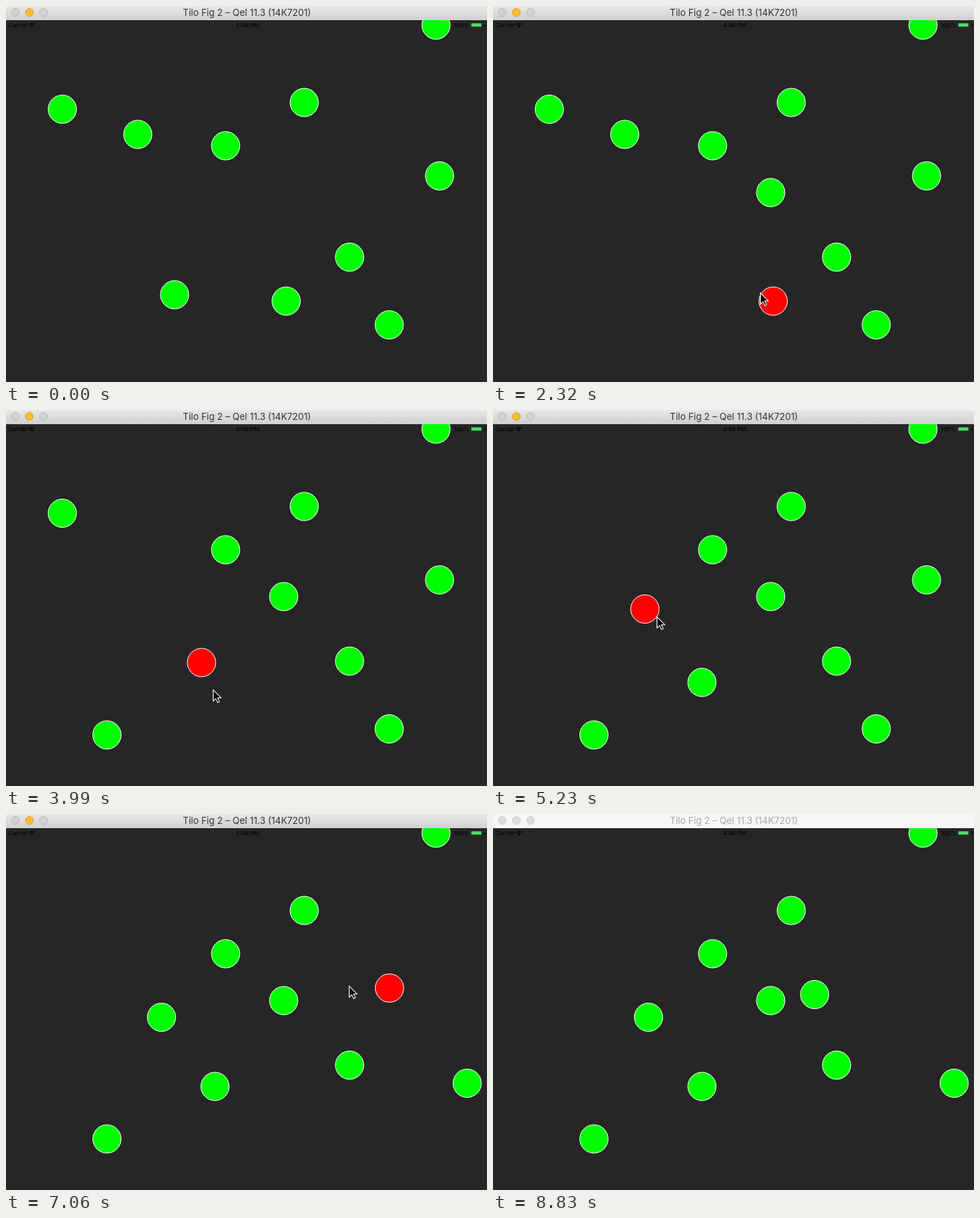
An HTML page that plays this animation: 679 by 530 pixels, repeating every 8910 ms.

```html
<!DOCTYPE html>
<html lang="en">
<head>
<meta charset="utf-8">
<title>Draggable circles</title>
<style>
  html, body { margin: 0; width: 100%; height: 100%; overflow: hidden; background: #262626; }
  svg { display: block; width: 679px; height: 530px; }
  text { font: 8.2px Inter, "Liberation Sans", sans-serif; }
  #balls circle { fill: #0f0; stroke: #fff; stroke-width: 1; }
  #balls .held { fill: #f00; }
  #bar rect { fill: url(#metal); }
  #bar text { font-size: 13px; fill: #343434; text-anchor: middle; }
  #bar circle { fill: #d2d2d2; stroke: #b9b9b9; }
  #bar .min { fill: #fdbc2e; stroke: #dfa02b; }
  #bar.idle rect { fill: #f6f6f6; }
  #bar.idle text { fill: #a8a8a8; }
  #bar.idle circle { fill: #dcdcdc; stroke: #cecece; }
</style>
</head>
<body>
<svg viewBox="0 0 679 530">
  <defs>
    <linearGradient id="metal" x2="0" y2="1">
      <stop stop-color="#e8e8e8"/><stop offset="1" stop-color="#d0d0d0"/>
    </linearGradient>
  </defs>
  <rect width="679" height="530" fill="#262626"/>
  <g id="balls"></g>
  <g id="status">
    <text x="3" y="30">Carrier</text>
    <path d="M32.5 26q4-3.5 8 0m-6.2 2q2.200-2 4.400 0" fill="none" stroke="#000" stroke-width="1.2"/>
    <circle cx="36.5" cy="29.3" r="1"/>
    <text x="341" y="30" text-anchor="middle">4:46 PM</text>
    <text x="654" y="30" text-anchor="end">100%</text>
    <rect x="656.5" y="24" width="15" height="5.5" rx="1" fill="#4cd964" stroke="#111" stroke-width=".6"/>
    <text x="673.500" y="30">+</text>
  </g>
  <g id="bar">
    <rect width="679" height="20"/>
    <circle cx="13" cy="9" r="5.5"/>
    <circle cx="33" cy="9" r="5.5" class="min"/>
    <circle cx="53" cy="9" r="5.5"/>
    <text x="340" y="14">Tilo Fig 2 – Qel 11.3 (14K7201)</text>
  </g>
  <path id="cursor" d="M.5.5v15.700l3.700-3.400 2.500 5.600 2.500-1.100-2.400-5.600h4.700z" stroke="#fff" stroke-width="1.1"/>
</svg>
<script>
const LOOP = 8910, STEP = 57;

// Pointer path: time, x, y
const path = [
  [840, 256, 491], [1120, 236, 400], [1420, 236, 400], [1473, 255, 369],
  [1530, 302, 306], [1701, 390, 256], [2070, 411, 457], [2320, 377, 404],
  [2970, 124, 446], [3030, 124, 446], [3190, 172, 247], [3480, 183, 191],
  [3650, 183, 191], [3933, 273, 366], [3990, 292, 394], [4540, 51, 138],
  [4790, 91, 150], [5230, 231, 291], [5290, 231, 291], [5490, 437, 438],
  [5850, 536, 451], [6390, 641, 387], [6450, 646, 381], [6720, 648, 270],
  [6920, 595, 232], [7060, 484, 242], [7290, 445, 246], [7380, 437, 247],
  [7900, 579, 532]
];

// Circles: x, y, then grab and drop times for the draggable ones
const balls = [
  [607, 27], [421, 136], [310, 197], [485, 354],
  [238, 407, 1420, 1701], [395.5, 416, 2320, 2970], [186, 181, 3650, 3990],
  [79.5, 145.5, 4790, 5230], [541, 449.5, 5850, 6450], [612, 239.5, 6920, 7380]
];

const $ = id => document.getElementById(id);
const nodes = balls.map(() => {
  const c = document.createElementNS("http://www.w3.org/2000/svg", "circle");
  c.setAttribute("r", 20);
  return $("balls").appendChild(c);
});

const slope = (i, axis) => (path[i + 1][axis] - path[i][axis]) / (path[i + 1][0] - path[i][0]);

// Tangent that never overshoots a turning point
function tangent(i, axis) {
  if (i === 0) return slope(0, axis);
  if (i === path.length - 1) return slope(i - 1, axis);
  const a = slope(i - 1, axis), b = slope(i, axis);
  return a * b > 0 ? 2 * a * b / (a + b) : 0;
}

function pointer(t) {
  const next = path.findIndex(p => p[0] > t);
  if (next < 1) return path.at(next).slice(1);
  const i = next - 1, span = path[next][0] - path[i][0];
  const k = (t - path[i][0]) / span, ease = k * k * (3 - 2 * k);
  return [1, 2].map(axis =>
    path[i][axis] + (path[next][axis] - path[i][axis]) * ease +
    span * k * (1 - k) * ((1 - k) * tangent(i, axis) - k * tangent(next, axis)));
}

function place(node, x, y) {
  node.setAttribute("transform", `translate(${x} ${y})`);
}

function draw(time) {
  // The screen refreshes in steps, realigned at each path point
  const sync = path.findLast(p => p[0] <= time)?.[0] ?? 0;
  const t = sync + Math.floor((time - sync) / STEP) * STEP;

  balls.forEach(([x, y, grab, drop], i) => {
    if (grab) {
      // A held circle trails the pointer by one refresh
      const from = pointer(grab);
      const to = pointer(Math.min(Math.max(t - STEP, grab), drop));
      x += to[0] - from[0];
      y += to[1] - from[1];
    }
    place(nodes[i], x, y);
    nodes[i].classList.toggle("held", t >= grab && t < drop + 100);
  });

  place($("cursor"), ...pointer(t).map(Math.round));
  $("cursor").style.display = t < 840 ? "none" : "";
  $("bar").classList.toggle("idle", time >= 8830);
}

const start = performance.now();
function tick() {
  draw((performance.now() - start) % LOOP);
  requestAnimationFrame(tick);
}
tick();
</script>
</body>
</html>
```
